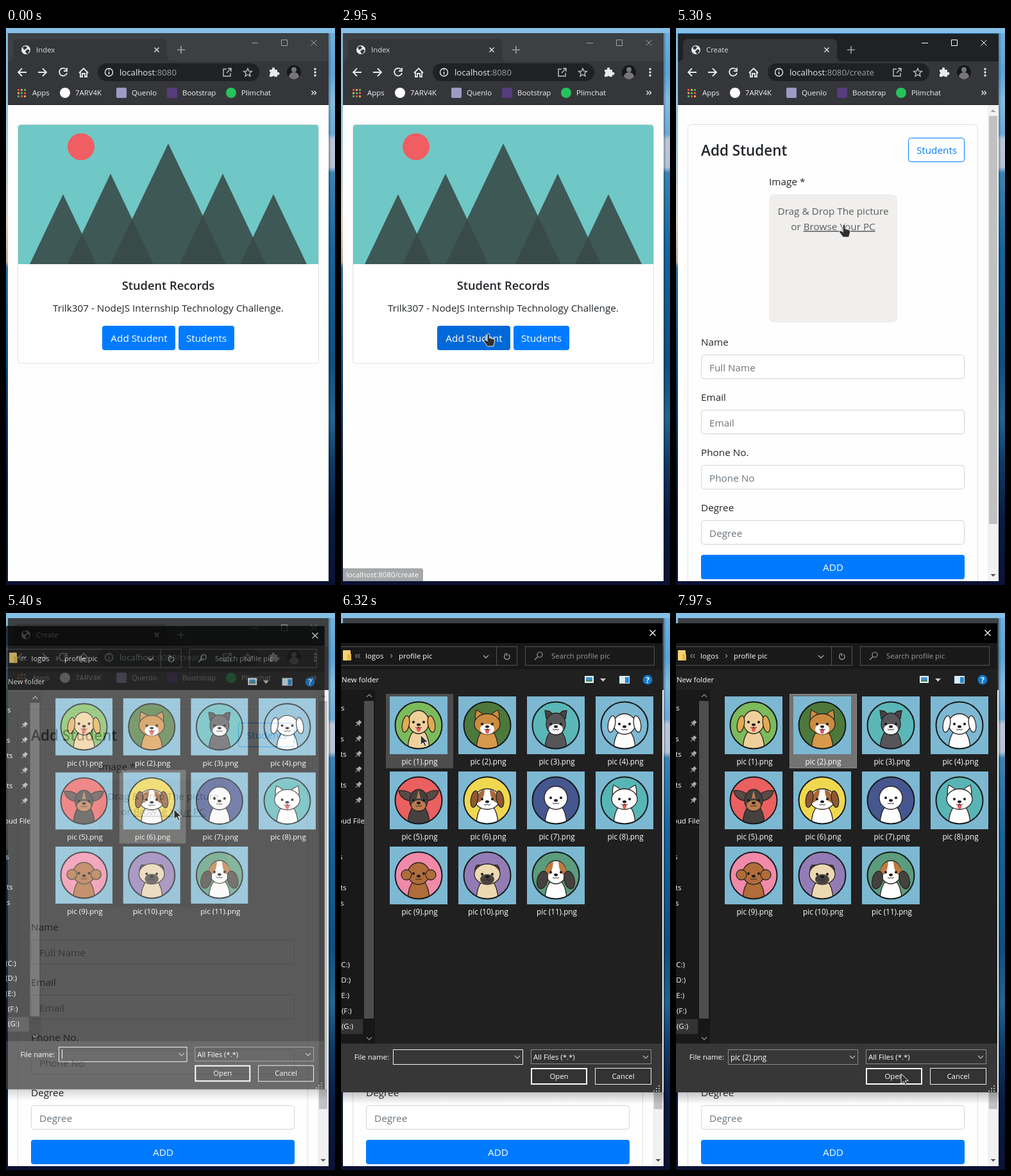
An HTML page for the animation above (8 s loop, 513 px wide and 868 px high).

```html
<!DOCTYPE html>
<html lang="en">
<head>
<meta charset="utf-8">
<title>Student Records</title>
<style>
  html, body { margin: 0; width: 100%; height: 100%; overflow: hidden; background: #0b1238; }
  svg { display: block; width: 100%; height: 100%; }
  text { font-family: "Open Sans", "Noto Sans", sans-serif; white-space: pre; }
</style>
</head>
<body>
<svg id="stage" viewBox="0 0 513 868"></svg>
<script>
const LOOP = 8000;
const BLUE = '#007bff', HOVER_BLUE = '#0069d9', INK = '#212529';
const UI = 11.4, BODY = 15.3;

const rect = (x, y, w, h, fill, extra = '') =>
  `<rect x="${x}" y="${y}" width="${w}" height="${h}" fill="${fill}" ${extra}/>`;
const circle = (x, y, r, fill, extra = '') => `<circle cx="${x}" cy="${y}" r="${r}" fill="${fill}" ${extra}/>`;
const oval = (x, y, rx, ry, fill, extra = '') =>
  `<ellipse cx="${x}" cy="${y}" rx="${rx}" ry="${ry}" fill="${fill}" ${extra}/>`;
const shape = (d, fill, extra = '') => `<path d="${d}" fill="${fill}" ${extra}/>`;
const line = (d, color, width = 1) => shape(d, 'none', `stroke="${color}" stroke-width="${width}"`);
const text = (x, y, str, size, fill, extra = '') =>
  `<text x="${x}" y="${y}" font-size="${size}" fill="${fill}" ${extra}>${str}</text>`;
const group = (id, content, extra = '') => `<g id="${id}" ${extra}>${content}</g>`;
const gradient = (id, stops) => `<linearGradient id="${id}" x1="0" y1="0" x2="0" y2="1">${
  stops.map(([at, color]) => `<stop offset="${at}" stop-color="${color}"/>`).join('')}</linearGradient>`;
const MIDDLE = 'text-anchor="middle"';

function wallpaper() {
  return `<defs>${gradient('skyRight', [[0, '#6fb2de'], [.08, '#5aa3d4'], [.13, '#83bce0'], [.19, '#6aa9d5'],
      [.2, '#bcc6da'], [.25, '#b3c2d8'], [.26, '#3b83b3'], [.4, '#16659b'], [.6, '#0d5080'], [.7, '#23658f'],
      [.78, '#0e3a66'], [.88, '#081c42'], [1, '#0a1236']])}
    ${gradient('skyLeft', [[0, '#7db9e2'], [.2, '#9cc8e2'], [.35, '#dccbbd'], [.42, '#c0a79b'], [.43, '#2f6f9f'],
      [.6, '#0c4a78'], [.8, '#081c42'], [1, '#0a0f30']])}</defs>`
    + rect(0, 0, 260, 868, 'url(#skyLeft)') + rect(260, 0, 253, 868, 'url(#skyRight)')
    + rect(0, 0, 513, 8, '#84bfe6')
    + rect(0, 862, 513, 6, '#0a1133') + rect(503, 8, 3, 854, '#000', 'opacity=".18"');
}

function browser() {
  const white = '#e8eaed', grey = '#9aa0a6';
  const dots = [0, 1, 2, 3, 4, 5, 6, 7, 8].map(i =>
    rect(18 + i % 3 * 5, 95 + (i / 3 | 0) * 5, 3, 3, ['#ea4f43', '#e8a33a', '#4caf6d'][(i + (i / 3 | 0)) % 3])).join('');
  const bookmarks = [[41, 'Apps'], [108, '7ARV4K'], [196, 'Quenlo'], [275, 'Bootstrap'], [367, 'Plimchat']]
    .map(([x, label]) => text(x, 105, label, UI, '#f1f3f4')).join('');
  return rect(3, 8, 500, 854, '#35363a')
    + rect(3, 8, 500, 44, '#3c4043', 'id="titleBar"')
    + group('accent', line('M3 8.5H503', '#1d6fb5'))
    + shape('M3 52Q11 52 11 44V25Q11 17 19 17H243Q251 17 251 25V44Q251 52 259 52Z', '#35363a')
    + circle(31, 34, 7, white)
    + shape('M26 30l4-2 3 2-2 3-3 1zM30 36l4-3 3 2-3 5h-2z', '#35363a')
    + text(47, 38, 'Index', UI, '#dadce0', 'id="tabTitle"')
    + line('M231.5 30.5l7 7m0-7l-7 7', '#dadce0', 1.5) + line('M267 34h12m-6-6v12', grey, 1.6)
    + group('controls', '<path d="M383 23.5h10M429.5 18.5h9v9h-9zM475.5 18.5l9 9m0-9l-9 9"/>', 'fill="none" stroke="#a0a3a6"')
    + line('M32 69H19m6-6l-6 6 6 6M50 69h13m-6-6l6 6-6 6M94 65a6 6 0 1 0 1 5M95 62v5h-5M114 70l7-7 7 7M116 69v7h3v-5h4v5h3v-7', white, 1.8)
    + rect(143, 55, 252, 28, '#202124', 'rx="14"')
    + circle(160.5, 69, 6, 'none', `stroke="${white}" stroke-width="1.4"`) + line('M160.5 68v4.5m0-8v1.8', white, 1.5)
    + `<text x="177" y="74" font-size="13.2" fill="${white}">localhost<tspan id="urlPath" fill="${grey}"></tspan></text>`
    + line('M344 64h-5v11h11v-5M346 63h5v5m0-5l-7 7', '#c0c3c6', 1.4)
    + line('M377 63l1.8 4.2 4.5.4-3.4 3 1 4.4-3.9-2.3-3.9 2.3 1-4.4-3.4-3 4.5-.4z', '#c0c3c6', 1.4)
    + shape('M411 65h4a2.3 2.3 0 1 1 4 0h4v4a2.3 2.3 0 1 1 0 4v3h-4a2.2 2.2 0 0 0-4 0h-4v-4a2.2 2.2 0 0 0 0-4z', white)
    + circle(449, 69, 11, '#15171a') + circle(449, 65, 4, '#777') + shape('M441 76q1-7 8-7t8 7q-8 8-16 0z', '#777')
    + [64, 69, 74].map(y => circle(482, y, 1.7, white)).join('')
    + dots + circle(92, 101, 8, '#fff') + rect(172, 93, 16, 16, '#9e9ac4', 'rx="2"')
    + rect(251, 93, 16, 16, '#563d7c', 'rx="2"') + circle(351, 101, 8, '#25c35e') + bookmarks
    + line('M476.5 98l3 3-3 3m4-6l3 3-3 3', white, 1.4)
    + rect(3, 119, 500, 1, '#1f2023') + rect(3, 120, 500, 742, '#fefefe');
}

function homePage() {
  const peaks = [[89, 259, 52], [163, 227, 67], [253, 180, 90], [338, 227, 67], [417, 259, 52]]
    .map(([x, y, half]) => shape(`M${x} ${y}L${x + half} 368H${x - half}Z`, '#384947', 'opacity=".88"')).join('');
  return rect(18.5, 150.5, 469, 372, '#fff', 'rx="4" stroke="#dfdfdf"')
    + shape('M19 368V155Q19 151 23 151H483Q487 151 487 155V368Z', '#6fc8c6')
    + circle(117, 185, 21, '#f05d62') + peaks
    + text(253, 408, 'Student Records', 18.3, INK, `${MIDDLE} font-weight="600"`)
    + text(253, 442, 'Trilk307 - NodeJS Internship Technology Challenge.', BODY, INK, MIDDLE)
    + rect(148.5, 462.5, 117, 41, 'none', 'id="focusRing" rx="5" stroke="#80bdff" stroke-width="3"')
    + rect(150, 464, 114, 38, BLUE, 'rx="4" id="addButton"') + text(207.5, 489, 'Add Student', BODY, '#fff', MIDDLE)
    + rect(269, 464, 87, 38, BLUE, 'rx="4" id="listButton"') + text(312.5, 489, 'Students', BODY, '#fff', MIDDLE);
}

function formPage() {
  const fields = [['Name', 'Full Name'], ['Email', 'Email'], ['Phone No.', 'Phone No'], ['Degree', 'Degree']]
    .map(([label, hint], i) => {
      const y = 509 + i * 86;
      return text(39, y - 14, label, BODY, INK)
        + rect(39.5, y + .5, 410, 37, '#fff', 'rx="4" stroke="#ced4da"') + text(52, y + 26, hint, BODY, '#6c757d');
    }).join('');
  return line('M18.5 862V154.5Q18.5 150.5 22.5 150.5H466.5Q470.5 150.5 470.5 154.5V862', '#dfdfdf')
    + text(39, 199, 'Add Student', 22.5, INK, 'font-weight="600"')
    + rect(362.5, 171.5, 87, 37, '#fff', `rx="4" stroke="${BLUE}"`) + text(406.5, 196, 'Students', BODY, BLUE, MIDDLE)
    + text(145, 245, 'Image *', BODY, INK) + rect(145, 259, 200, 200, '#f0efee', 'rx="8"')
    + text(245, 291, 'Drag &amp; Drop The picture', BODY, '#5c5c5c', MIDDLE)
    + text(245, 315, 'or <tspan text-decoration="underline">Browse Your PC</tspan>', BODY, '#5c5c5c', MIDDLE)
    + fields + rect(39, 821, 411, 38, BLUE, 'rx="4"') + text(245, 846, 'ADD', BODY, '#fff', MIDDLE)
    + rect(486, 120, 17, 742, '#f1f1f1') + rect(488, 137, 13, 636, '#c1c1c1')
    + shape('M490.5 131l4-4 4 4z', '#a3a3a3') + shape('M490.5 851l4 4 4-4z', '#505050');
}

// Dogs are drawn on a 90 by 90 tile; paired parts are drawn once and mirrored.
const mirror = part => `${part}<g transform="translate(90) scale(-1 1)">${part}</g>`;
const EDGE = 'stroke="#2a2522" stroke-width="1.3" stroke-linejoin="round"';
const EARS = {
  flop: c => oval(25, 43, 5.5, 13, c, `${EDGE} transform="rotate(10 25 43)"`),
  point: c => shape('M27 42Q25 30 28 21Q35 24 41 30Z', c, EDGE),
  fold: c => shape('M30 35L28 22L35 23L42 29Z', c, EDGE),
  wide: c => shape('M33 46Q17 44 14 30Q27 28 37 37Z', c, EDGE),
  puff: c => circle(26, 44, 8, c, EDGE),
  long: c => oval(24, 52, 8, 14, c, `${EDGE} transform="rotate(14 24 52)"`),
  small: c => shape('M27 41Q24 35 29 29L40 29Z', c, EDGE),
};
const FRONT_EARS = ['flop', 'long', 'puff'];
const DOGS = [
  { bg: '#7cbb5c', coat: '#f0d09a', ear: 'flop', earColor: '#e2ab52', head: [16, 18, 40], tongue: true },
  { bg: '#4c783c', coat: '#cc8c40', ear: 'point', muzzle: '#fff', chest: '#d9994c', tongue: true },
  { bg: '#5ab7b8', coat: '#56565a', ear: 'fold', earColor: '#434347', muzzle: '#f4f4f4', head: [15, 17, 43] },
  { bg: '#7db8d2', coat: '#fcfcfc', ear: 'flop', head: [17, 16, 43] },
  { bg: '#ea6060', coat: '#45413f', ear: 'wide', earColor: '#5a4a47', muzzle: '#bd7b4d', blaze: '#bd7b4d', head: [14, 17, 45] },
  { bg: '#efd850', coat: '#fff', ear: 'flop', earColor: '#8f5831', patch: '#a96a3c' },
  { bg: '#46568f', coat: '#fff', head: [18, 18, 41] },
  { bg: '#58b5b6', coat: '#fff', ear: 'point', tongue: true },
  { bg: '#f08aa8', coat: '#b06c3a', ear: 'puff', head: [17, 17, 42] },
  { bg: '#937cb5', coat: '#ecd8b2', ear: 'small', earColor: '#4a4440', muzzle: '#4a4440' },
  { bg: '#5a9c7c', coat: '#fff', ear: 'long', earColor: '#45413f', patch: '#c07a3e', head: [16, 18, 40] },
];
function dog({ bg, coat, ear, earColor = coat, muzzle, chest = coat, patch, blaze, tongue, head = [20, 16, 43] }) {
  const [rx, ry, y] = head;
  const ears = ear ? mirror(EARS[ear](earColor)) : '', inFront = FRONT_EARS.includes(ear);
  return rect(0, 0, 90, 90, '#7db8d2') + circle(45, 45, 36.5, bg)
    + `<g clip-path="url(#medal)">${shape('M28 86Q28 63 37 54H53Q62 63 62 86Z', chest, EDGE)}${inFront ? '' : ears}`
    + oval(45, y, rx, ry, coat, EDGE)
    + (patch ? mirror(shape(`M41 ${y - ry + 1}Q27 ${y - 11} 28 ${y + 6}Q40 ${y + 5} 41 ${y - ry + 1}Z`, patch)) : '')
    + (blaze ? shape('M45 29L48 42H42Z', blaze) : '')
    + (inFront ? ears : '')
    + (muzzle ? oval(45, y + 8, 11, 8, muzzle) : '')
    + mirror(circle(37, y, 2, '#191717'))
    + (tongue ? oval(45, y + 11, 3, 4, '#e8585c') : '')
    + oval(45, y + 4, 3, 2, '#191717') + line(`M40 ${y + 8}q3 3 5 0q2 3 5 0`, '#2a2522') + '</g>'
    + circle(45, 45, 36.5, 'none', 'stroke="#16191b" stroke-width="2"');
}

const cellAt = i => [70 + i % 4 * 107, 126 + (i / 4 | 0) * 117];

function dialog() {
  const ink = '#fff', soft = '#9a9a9a';
  const side = [[0, 152, 's'], [-1, 200, 's'], [-1, 224, 'ts'], [-1, 272, 'ts'], [-5, 328, 'oud File'], [-3, 384, 's'],
    [-1, 432, 'ts'], [-1, 456, 's'], [-3, 552, '(C:)'], [-3, 576, '(D:)'], [-3, 600, '(E:)'], [1, 624, '(F:)'], [1, 648, '(G:)']]
    .map(([x, y, label]) => text(x, y, label, UI, ink)).join('');
  const pins = [0, 1, 2, 3, 4, 5].map(i => `<g transform="translate(27 ${172 + i * 24}) rotate(45)">${
    rect(-2.5, -5, 5, 5, '#aaa') + rect(-4, 0, 8, 1.5, '#aaa') + rect(-.5, 1, 1, 5, '#aaa')}</g>`).join('');
  const files = DOGS.map((spec, i) => {
    const [x, y] = cellAt(i);
    return `<g transform="translate(${x + 6} ${y + 4})">${dog(spec)}</g>`
      + text(x + 52.5, y + 110, `pic (${i + 1}).png`, 11.7, ink, MIDDLE);
  }).join('');
  const grip = [[0, 0], [-4, 4], [0, 4], [-8, 8], [-4, 8], [0, 8]]
    .map(([x, y]) => rect(495 + x, 736 + y, 2, 2, '#aaa')).join('');
  return `<defs><clipPath id="medal"><circle cx="45" cy="45" r="36.5"/></clipPath>
      <linearGradient id="shade" x1="0" y1="0" x2="0" y2="1"><stop stop-opacity=".22"/><stop offset="1" stop-opacity="0"/></linearGradient></defs>`
    + rect(-40, 747, 545, 18, 'url(#shade)')
    + rect(-40, 16, 541, 731, '#202020') + rect(-40, 16, 541, 31, '#000') + rect(-40, 47, 541, 41, '#191919')
    + line('M481.5 26.5l9 9m0-9l-9 9', ink, 1.3)
    + rect(-40, 52.5, 314.5, 29, '#191919', 'stroke="#535353"') + rect(287.5, 52.5, 201, 29, '#191919', 'stroke="#535353"')
    + rect(3, 58, 12, 16, '#f6d274', 'rx="1"') + rect(10, 64, 6, 10, '#e5b94e')
    + line('M25.5 64l-3 3 3 3m4-6l-3 3 3 3M77 64l3 3-3 3', '#c8c8c8') + line('M222 66l4 4 4-4', '#aaa', 1.4)
    + line('M242.5 53v28', '#535353') + line('M261 64.5a4.2 4.2 0 1 1-5 .5M255 63.5h3.500v3.500', '#aaa', 1.2)
    + text(38, 71, 'logos', UI, ink) + text(90, 71, 'profile pic', UI, ink)
    + circle(310, 65, 4, 'none', `stroke="${soft}" stroke-width="1.2"`) + line('M307 68l-5 5', soft, 1.3)
    + text(328, 71, 'Search profile pic', UI, soft)
    + text(1, 108, 'New folder', UI, ink)
    + rect(380, 98, 14, 11, '#f0f5f8') + rect(382, 100, 10, 4, '#3f9ad6') + rect(382, 104, 10, 3, '#4a8a6b')
    + shape('M404 102h9l-4.5 5z', '#ccc') + rect(434, 98, 16, 12, '#d8ecf8') + rect(443, 100, 6, 9, '#2a8bd0')
    + circle(478, 104, 7.5, '#147acb') + text(478, 108.5, '?', 12, ink, `${MIDDLE} font-weight="700"`)
    + rect(-40, 120, 76, 551, '#191919') + rect(0, 633, 34, 23, '#333') + side + pins
    + rect(36, 120, 17, 551, '#171717') + rect(36, 137, 15, 495, '#4d4d4d')
    + line('M40 131l4-4 4 4M40 661l4 4 4-4', '#888', 1.4)
    + rect(0, 0, 105, 116, '#4d4d4d', 'id="hoverCell"')
    + rect(177.5, 126.5, 104, 115, '#737373', 'id="pickedCell" stroke="#8c8c8c"')
    + files
    + rect(-40, 671, 541, 76, '#373737')
    + text(75, 696, 'File name:', UI, ink, 'text-anchor="end"')
    + rect(81.5, 680.5, 202, 23, '#373737', 'id="nameField"') + text(85, 697, 'pic (2).png', 11.7, ink, 'id="fileName"')
    + rect(86, 684, 1, 15, '#fff', 'id="caret"')
    + rect(296.5, 680.5, 187, 22, '#333', 'stroke="#8d8d8d"') + text(300, 696, 'All Files (*.*)', UI, ink)
    + line('M271 690l4 4 4-4M471 690l4 4 4-4', '#bbb', 1.2)
    + rect(297, 710, 86, 24, '#333', 'stroke="#fff" stroke-width="2"') + text(340, 726, 'Open', UI, ink, MIDDLE)
    + rect(396.5, 709.5, 87, 25, '#333', 'stroke="#f0f0f0"') + text(440, 726, 'Cancel', UI, ink, MIDDLE)
    + grip;
}

const POINTER = group('pointer',
  group('arrow', shape('M0 0V15.5L3.8 12L6.3 17.5L8.8 16.4L6.3 11H11.5Z', '#303030'))
  + group('hand', shape('M-1.8 1.5Q0-1 1.8 1.5V7L8 8.5Q10 9.5 9.5 13L7.5 20H-1.5L-7.5 12Q-7.5 9-4.5 10L-1.8 12Z', '#303030')),
  'stroke="#fff" stroke-width=".9" stroke-linejoin="round"');

document.getElementById('stage').innerHTML = wallpaper() + browser()
  + group('home', homePage()) + group('form', formPage(), 'clip-path="url(#page)"')
  + '<defs><clipPath id="page"><rect x="3" y="120" width="500" height="742"/></clipPath></defs>'
  + group('status', shape('M3 842H125Q128 842 128 845V862H3Z', '#35363a') + text(8, 856, '', 11.3, '#fff', 'id="statusText"'))
  + group('dialog', dialog()) + POINTER;

const el = id => document.getElementById(id);
const show = (id, on) => { el(id).style.display = on ? '' : 'none'; };
const set = (id, name, value) => el(id).setAttribute(name, value);
const within = (t, a, b) => t >= a && t < b;
const ramp = (t, a, b) => Math.min(1, Math.max(0, (t - a) / (b - a)));

const PATH = [[890, 266, 860], [935, 276, 851], [1590, 276, 866], [1760, 292, 610], [1940, 271, 515], [2160, 296, 480],
  [2380, 290, 479], [2600, 240, 478], [2800, 230, 476], [3880, 230, 476], [4040, 281, 353], [4200, 270, 312],
  [4310, 262, 306], [5730, 262, 306], [5880, 318, 280], [6080, 215, 236], [6240, 126, 192], [6340, 124, 190],
  [6520, 226, 183], [6540, 228, 184], [7020, 228, 184], [7350, 330, 420], [7670, 445, 725], [7780, 462, 720],
  [7950, 351, 718]];

function pointerAt(t) {
  const next = PATH.findIndex(key => key[0] > t);
  if (next < 1) return PATH[next < 0 ? PATH.length - 1 : 0].slice(1);
  const [t0, x0, y0] = PATH[next - 1], [t1, x1, y1] = PATH[next];
  const u = ramp(t, t0, t1), k = u * u * (3 - 2 * u);
  return [x0 + (x1 - x0) * k, y0 + (y1 - y0) * k];
}

function render(t) {
  const [x, y] = pointerAt(t);
  const onForm = t >= 3230, focused = within(t, 3100, 5330);
  const onButtons = !onForm && t >= 1590 && y >= 464 && y < 502;
  const overAdd = onButtons && x >= 150 && x < 264, overList = onButtons && x >= 269 && x < 356;

  set('titleBar', 'fill', focused ? '#202124' : '#3c4043');
  set('controls', 'stroke', focused ? '#fff' : '#a0a3a6');
  show('accent', focused);
  el('tabTitle').textContent = onForm ? 'Create' : 'Index';
  el('urlPath').textContent = onForm ? ':8080/create' : ':8080';
  show('home', !onForm);
  show('form', onForm);
  show('focusRing', within(t, 3100, 3230));
  set('addButton', 'fill', overAdd ? HOVER_BLUE : BLUE);
  set('listButton', 'fill', overList ? HOVER_BLUE : BLUE);

  const early = t < 2700;
  el('statusText').textContent = 'localhost:8080/' + (early ? 'students' : 'create');
  const bubble = early ? ramp(t, 2200, 2380) * (1 - ramp(t, 2440, 2640)) : ramp(t, 2850, 3085);
  set('status', 'opacity', onForm ? 0 : bubble);

  const open = 1 - (1 - ramp(t, 5330, 5530)) ** 3, scale = .953 + .047 * open;
  const picked = t >= 6900;
  show('dialog', t >= 5330);
  set('dialog', 'opacity', open);
  set('dialog', 'transform', `translate(165 365) scale(${scale}) translate(-165 -365)`);
  const col = Math.floor((x - 70) / 107), row = Math.floor((y - 126) / 117), cell = row * 4 + col;
  const [cx, cy] = cellAt(cell);
  const hovering = col >= 0 && col < 4 && row >= 0 && cell < DOGS.length && x < cx + 105 && y < cy + 116;
  show('hoverCell', hovering);
  if (hovering) { set('hoverCell', 'x', cx); set('hoverCell', 'y', cy); }
  show('pickedCell', picked);
  show('fileName', picked);
  set('nameField', 'stroke', picked ? '#8d8d8d' : '#f4f4f4');
  show('caret', !picked && Math.floor((t - 5340) / 530) % 2 === 0);

  const hand = overAdd || overList || within(t, 3230, 3880) || within(t, 4240, 5330);
  show('pointer', within(t, 890, 940) || t >= 1590);
  show('hand', hand);
  show('arrow', !hand);
  set('pointer', 'transform', `translate(${x.toFixed(1)} ${y.toFixed(1)})`);
}

const start = performance.now();
function tick() {
  render((performance.now() - start) % LOOP);
  requestAnimationFrame(tick);
}
tick();
</script>
</body>
</html>
```
